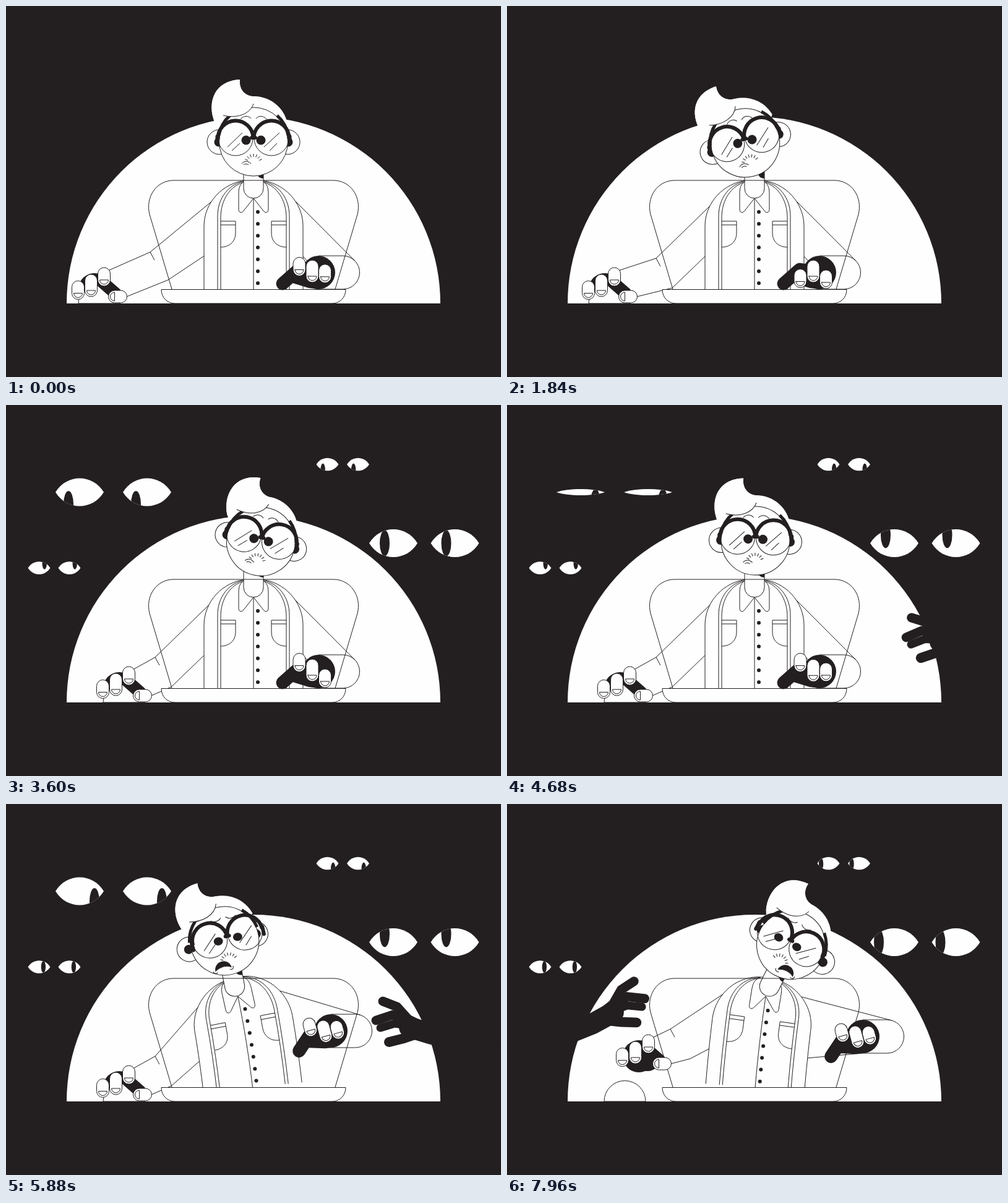
Write an HTML page with a canvas that moves like this. It is 800 by 600 pixels and loops after 8 s.

```html
<!DOCTYPE html>
<html lang="en">
<head>
<meta charset="utf-8">
<title>Watched</title>
<style>
html, body { margin: 0; width: 100%; height: 100%; overflow: hidden; background: #231f20; }
canvas { display: block; }
</style>
</head>
<body>
<canvas id="stage" width="800" height="600"></canvas>
<script>
const ctx = document.getElementById('stage').getContext('2d');
const INK = '#231f20', PAPER = '#fefefe', LOOP = 8000, TAU = Math.PI * 2;
const { sin, cos, min, max, abs } = Math;
const rad = deg => deg * Math.PI / 180;
const lerp = (a, b, u) => a + (b - a) * u;
let now = 0;

// Eased 0..1 ramp and a short triangular pulse at the current time.
function ramp(start, length) {
  const u = min(1, max(0, (now - start) / length));
  return u * u * (3 - 2 * u);
}
const pulse = (peak, half) => max(0, 1 - abs(now - peak) / half);

function blend(a, b, u) {
  const out = {};
  for (const key in a) out[key] = lerp(a[key], b[key], u);
  return out;
}

function shape(d, fill, stroke = INK, width = 1) {
  const path = new Path2D(d);
  if (fill) { ctx.fillStyle = fill; ctx.fill(path); }
  if (stroke) { ctx.strokeStyle = stroke; ctx.lineWidth = width; ctx.stroke(path); }
}
function disc(x, y, rx, fill = INK, stroke = null, ry = rx) {
  ctx.beginPath();
  ctx.ellipse(x, y, rx, ry, 0, 0, TAU);
  ctx.fillStyle = fill;
  ctx.fill();
  if (stroke) { ctx.strokeStyle = stroke; ctx.lineWidth = 1; ctx.stroke(); }
}
function arc(x, y, r, from, to, width = 1) {
  ctx.beginPath();
  ctx.arc(x, y, r, rad(from), rad(to));
  ctx.strokeStyle = INK;
  ctx.lineWidth = width;
  ctx.stroke();
}
function at(x, y, deg, draw) {
  ctx.save();
  ctx.translate(x, y);
  ctx.rotate(rad(deg));
  draw();
  ctx.restore();
}
const mapPath = (d, fn) => d.replace(/(-?[\d.]+) (-?[\d.]+)/g, (_, x, y) => fn(+x, +y).join(' '));

// ---- motion ----
const CALM = { head: 0, neck: 0, lean: 0, turn: 0, spread: 12, glance: 0, palmX: 505, palmY: 431, wrist: 0 };
const SCARED = { head: -13, neck: -11, lean: 1, turn: 6, spread: 16, glance: 0, palmX: 525, palmY: 367, wrist: -15 };
const REACH = { head: 28, neck: 26, lean: -.72, turn: -4, spread: 16.5, glance: -3, palmX: 575, palmY: 376, wrist: -15 };

function currentPose() {
  const scare = ramp(5250, 300), reach = ramp(6900, 600);
  const calm = {
    ...CALM,
    head: -15 * ramp(900, 400) + 27 * ramp(2650, 550) - 12 * ramp(3700, 400) + 1.5 * ramp(4200, 400),
    glance: 4 * (ramp(600, 160) - ramp(60, 150))
  };
  const pose = blend(calm, SCARED, scare);
  const settle = 1 - .08 * ramp(5900, 800);
  for (const key of ['head', 'neck', 'lean']) pose[key] *= settle;
  return {
    ...blend(pose, REACH, reach),
    reach,
    open: ramp(5300, 200) - ramp(6200, 400) + ramp(7000, 400),
    mouthX: 25 * ramp(7000, 400)
  };
}

function leftArm(reach) {
  const nudge = ramp(100, 500);
  const desk = {
    x: 143 + 15 * nudge + 12 * ramp(1900, 500) + 13 * ramp(2700, 400), y: 458,
    ex: 233 + 8 * nudge, ey: 398 + 10 * nudge, lx: 262 + 5 * nudge, ly: 443 + 13 * nudge
  };
  return blend(desk, { x: 213, y: 408, ex: 264, ey: 364, lx: 296, ly: 412 }, reach);
}

// ---- the dark ----
// Each pair moves on to its next look, a pupil offset, with every blink.
const EYES = [
  { x: 119, y: 141, gap: 109, s: 1, open: 2900, shut: 7670, blinks: [4660], looks: [[-18, 19], [24, 16]] },
  { x: 626, y: 223.5, gap: 99.5, s: 1, open: 2750, blinks: [3950, 6320], looks: [[-14, 0], [-14, -13], [-25, 0]] },
  { x: 519.5, y: 96, gap: 49.5, s: .46, open: 2150, blinks: [4440, 6800], looks: [[-16, 18], [20, 18], [-26, 2]] },
  { x: 53.5, y: 263.5, gap: 49, s: .46, open: 3050, blinks: [5450], looks: [[19, -16], [15, 0]] }
];

function drawEyes() {
  for (const e of EYES) {
    let lid = ramp(e.open, 220) * (1 - ramp(e.shut || LOOP, 220));
    for (const b of e.blinks) lid *= 1 - .9 * pulse(b, 150);
    if (lid < .02) continue;
    const [dx, dy] = e.looks[e.blinks.filter(b => now >= b).length];
    const h = 30 * lid;
    for (const x of [e.x, e.x + e.gap]) {
      ctx.save();
      ctx.translate(x, e.y);
      ctx.scale(e.s, e.s);
      const almond = new Path2D(`M-39 0C-21 ${-h} 21 ${-h} 39 0C21 ${h} -21 ${h} -39 0Z`);
      ctx.fillStyle = PAPER;
      ctx.fill(almond);
      ctx.clip(almond);
      disc(dx, dy, 8, INK, null, 21);
      ctx.restore();
    }
  }
}

// hide pulls the hand back out of the light, stretch pushes it further in.
function shadowHand(hide, stretch, mirrored) {
  ctx.save();
  if (mirrored) { ctx.translate(800, 0); ctx.scale(-1, 1); }
  ctx.lineCap = ctx.lineJoin = 'round';
  at(112 - 130 * hide + 27 * stretch, 372 + 50 * hide - 17 * stretch, 12 * (hide - stretch), () => {
    shape('M-90 16L0 0L36 -11', null, INK, 34);
    shape('M22 -16L38 -24L56 -44L79 -53', null, INK, 15);
    shape('M40 -22L63 -31L90 -22', null, INK, 15);
    shape('M38 -14L60 -17L83 -10', null, INK, 13);
    shape('M24 0L45 7L69 13', null, INK, 16);
  });
  ctx.restore();
}

// ---- the man ----
function finger(x, y, h, angle = 0) {
  at(x, y, angle, () => {
    const b = h / 2, n = b - 10;
    shape(`M-10 ${10 - b}A10 10 0 0 1 10 ${10 - b}L10 ${n}A10 10 0 0 1 -10 ${n}Z`, PAPER);
    shape(`M-7 ${n}L7 ${n}A7 7 0 0 1 -7 ${n}Z`, PAPER);
  });
}

// Bends the torso sideways around the waist.
const bend = lean => (x, y) => {
  const d = 458 - y, a = -Math.atan(lean * (.095 + .0009 * d));
  return [400 - lean * (1.5 + .095 * d + .00045 * d * d) + (x - 400) * cos(a), y + (x - 400) * sin(a)];
};

function drawArms(pose, left, warp) {
  const { x, y, ex, ey, lx, ly } = left;
  shape(`M${warp(352, 300)}L${ex} ${ey}L${x + 22} ${y - 30}M${ex} ${ey}l7 13`);
  shape(`M${warp(322, 403)}L${lx} ${ly}L${x + 52} ${y + 12}`);

  // The upper arm is the tangent from the shoulder to the round elbow.
  const { palmX: px, palmY: py, wrist } = pose, r = 27, cx = px + 39.5;
  let [sx, sy] = warp(470, 318);
  sy += 20 * min(0, pose.lean);
  const slope = Math.atan2(py - sy, cx - sx) - Math.asin(r / Math.hypot(cx - sx, py - sy));
  const c = cos(slope), s = sin(slope);
  shape(`M${cx + r * s} ${py - r * c}L${sx - 14 * c} ${sy - 14 * s}`);
  shape(`M${px} ${py - r}L${cx} ${py - r}A${r} ${r} 0 0 1 ${cx} ${py + r}L${px} ${py + r}`);
  shape(`M${warp(478, 403)}L${px} ${py - wrist / 15 * r}`);
}

function drawTorso(warp) {
  const line = (d, fill) => shape(mapPath(d, warp), fill);
  const both = (d, fill) => {
    line(d, fill);
    line(mapPath(d, (x, y) => [800 - x, y]), fill);
  };
  line('M320 458C320 430 320 390 320 356C320 318 350 286 388 282L412 282C450 286 480 318 480 356C480 390 480 430 480 458', PAPER);
  both('M342 458C342 420 342 380 342 340C342 310 360 288 386 283');
  both('M347 458C347 420 347 380 347 342C347 314 362 290 387 284');
  line('M400 458C400 410 400 360 400 311');
  both('M347 348L371 348L371 354L347 354M371 354L371 367C371 382 360 390 347 390');
  both('M385 284C377 288 376 296 376 304L376 328C376 335 381 336 385 330L400 311', PAPER);
  for (let i = 0; i < 7; i++) disc(...warp(407, 333 + i * 19.2), 3);
}

function drawNeck(x, angle) {
  at(x, 295, angle, () => {
    shape('M-16 -28L-16 0A16 16 0 0 0 16 0L16 -28', PAPER);
    shape('M4 -28L16 -28L16 -16Q8 -16 6 -23Z', INK, null);
  });
}

function drawGlasses({ turn, spread, glance, open }) {
  ctx.save();
  ctx.translate(turn, 0);
  const brow = 177 + 10 * open;
  shape(`M379 183C384 ${brow} 392 ${brow} 396 182M404 182C408 ${brow} 416 ${brow} 421 183`);
  for (const lens of [371, 429]) {
    arc(lens, 214, 28, 0, 360);
    arc(lens, 214, 28.5, 178, 360, 6);
  }
  ctx.lineCap = 'round';
  shape('M397 213L403 213M341.5 211L341.5 223M458.5 211L458.5 223', null, INK, 6);
  ctx.lineCap = 'butt';
  shape('M358 228L382 205M365 234L378 222M417 228L442 205M426 234L438 222');
  for (const side of [-1, 1]) disc(400 + side * spread + glance, 217 + open, 7.5, INK, null, 7.5 - open);
  ctx.restore();
}

function drawMouth(open, shift) {
  ctx.translate(shift, 0);
  if (open < .3) {
    shape('M381 255C385 250 391 250 396 255M384 257C386 255 390 255 392 257');
    return;
  }
  ctx.translate(388, 259);
  ctx.scale(1, open);
  shape('M-13 5C-12 -11 11 -12 13 4C5 -1 -5 0 -13 5Z', INK);
  shape('M-17 5C-17 9 -13 10 -10 8M16 3C17 8 13 9 10 7');
}

function drawHead(x, y, pose) {
  const { head, turn } = pose;
  const quiff = 'M338 189C325 160 334 121 378 119C376 136 388 147 402 146';
  at(x, y, head, () => {
    ctx.translate(-400, -220);
    for (const side of [-1, 1]) {
      disc(400 + side * 55 - turn * .6, 220, 20, PAPER, INK);
      disc(400 + side * 56 - turn * .6, 220, 7.5);
    }
    shape(quiff + 'C428 147 448 164 454 186L440 210L350 210Z', PAPER, null);
    disc(400, 219.5, 55.5, PAPER, INK);
    arc(400, 219.5, 57, 190, 228, 5);
    arc(400, 219.5, 57, 312, 350, 5);
    shape(quiff + 'L400 158C394 176 372 183 351 177Z', PAPER, null);
    shape('M351 177C372 182 394 176 400 158');
    drawGlasses(pose);

    const nose = 400 + min(0, turn);
    for (let i = 0; i < 7; i++) {
      const a = rad(-155 + i * 130 / 6), c = cos(a), s = sin(a);
      shape(`M${nose + 10 * c} ${254 + 10 * s}L${nose + 15 * c} ${254 + 15 * s}`);
    }
    drawMouth(pose.open, pose.mouthX);
  });
}

function drawRightHand({ palmX, palmY, wrist }) {
  const typing = 1 - ramp(5000, 200);
  const tap = (peak, period) => typing * max(0, cos(TAU * (now - peak) / period)) ** 3;
  disc(palmX, palmY, 27);
  at(palmX, palmY, wrist, () => {
    ctx.lineCap = ctx.lineJoin = 'round';
    shape('M-58 18L-32 -5L0 0', null, INK, 21);
    shape('M-36 0L-42 17L-16 25L0 27L0 0Z', INK, null);
    finger(-31, -9.5 - 5 * ramp(2500, 300) + 19 * tap(1840, 390), 30);
    finger(-10, -2 + 10 * tap(1950, 350), 36);
    finger(10.5, 1 + 10 * tap(1840, 440), 30);
  });
}

function drawLeftHand({ x, y }) {
  const mouse = min(x + 7.5, 190.5);
  const click = 11 * (pulse(1090, 90) + pulse(1370, 90));
  disc(x, y, 26);
  disc(x + 14, y + 4, 20);
  shape(`M${mouse - 33.5} 481A33.5 33.5 0 0 1 ${mouse + 33.5} 481Z`, PAPER);
  ctx.lineCap = 'round';
  shape(`M${x + 10} ${y - 14}L${x + 34} ${y + 7}`, null, INK, 20);
  ctx.lineCap = 'butt';
  finger(x - 26.5, y + 1.5, 30);
  finger(x - 5.5, y - 6, 36);
  finger(x + 15.5, y - 20 + click, 30);
  finger(x + 37.5, y + 12, 30, 90);
}

function drawLaptop() {
  shape('M268 458L232 337C225 309 243 282 271 282L529 282C557 282 575 309 568 337L532 458');
  shape('M251 458.5L549 458.5C549 471 540 481 527 481L273 481C260 481 251 471 251 458.5Z', PAPER);
}

function draw() {
  const pose = currentPose(), left = leftArm(pose.reach), warp = bend(pose.lean);

  ctx.fillStyle = INK;
  ctx.fillRect(0, 0, 800, 600);
  shape('M98 481A302 302 0 0 1 702 481Z', PAPER, null);
  shadowHand(1 - ramp(6050, 500), ramp(6400, 1300), false);
  shadowHand(1 - ramp(4330, 600) + ramp(6480, 600), 0, true);
  drawEyes();

  drawArms(pose, left, warp);
  drawTorso(warp);
  const neckX = warp(400, 295)[0] + pose.neck * .13;
  drawNeck(neckX, pose.neck);
  drawLaptop();
  drawLeftHand(left);
  drawRightHand(pose);

  const n = rad(pose.neck), h = rad(pose.head);
  drawHead(neckX + 18 * sin(n) + 57 * sin(h), 295 - 18 * cos(n) - 57 * cos(h), pose);
}

function frame() {
  now = performance.now() % LOOP;
  draw();
  requestAnimationFrame(frame);
}
frame();
</script>
</body>
</html>
```
